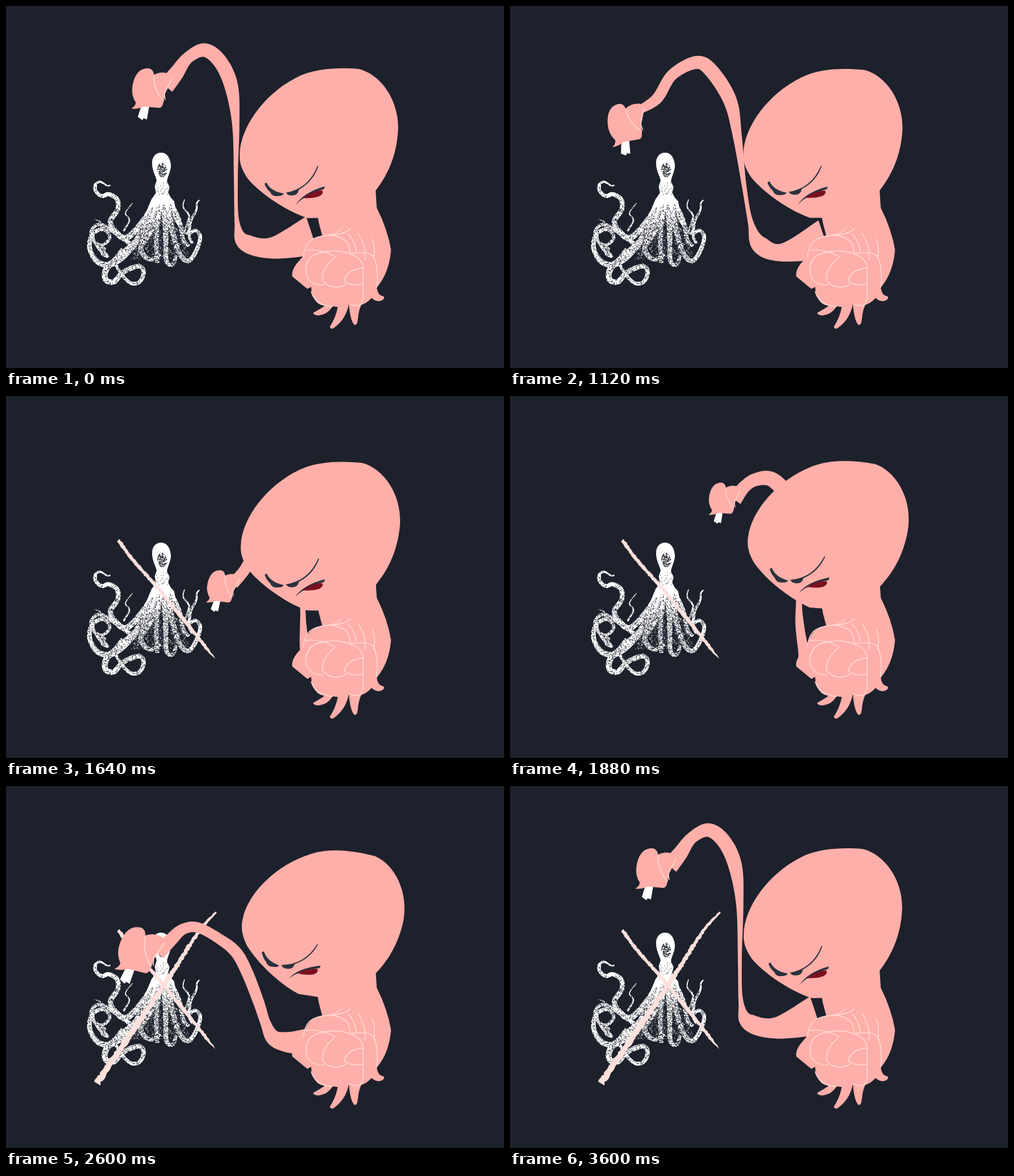
Write an HTML page with a canvas that moves like this. It is 767 by 558 pixels and loops after 3.84 s.

```html
<!DOCTYPE html>
<html lang="en">
<head>
<meta charset="utf-8">
<title>Crossing out the octopus</title>
<style>
html, body { margin: 0; width: 100%; height: 100%; overflow: hidden; background: #1d212c; }
canvas { display: block; }
</style>
</head>
<body>
<canvas id="stage" width="767" height="558"></canvas>
<script>
const LOOP = 3840, STEP = 40;
const BG = '#1d212c', PINK = '#ffafa9', LINE = '#ffdcd8', CHALK = '#ffe0dc', INK = '#2a323e', RED = '#7b0f1f';
const ctx = document.getElementById('stage').getContext('2d');

const clamp = v => Math.max(0, Math.min(1, v));
const mix = (a, b, k) => a + (b - a) * k;
const mixAll = (a, b, k) => a.map((v, i) => mix(v, b[i], k));
const linear = k => k;
const easeOut = k => 1 - (1 - k) ** 2;
const easeInOut = k => k * k * (3 - 2 * k);
const random = seed => () => (seed = (seed * 16807) % 2147483647) / 2147483647;

// Catmull-Rom samples through flat tuples of the given size
function spline(flat, size, steps = 10) {
  const n = flat.length / size, out = [];
  const at = (i, c) => flat[Math.max(0, Math.min(n - 1, i)) * size + c];
  for (let s = 0; s <= (n - 1) * steps; s++) {
    const i = Math.min(n - 2, Math.floor(s / steps)), u = s / steps - i, sample = [];
    for (let c = 0; c < size; c++) {
      const a = at(i - 1, c), b = at(i, c), d = at(i + 1, c), e = at(i + 2, c);
      sample.push(b + u / 2 * (d - a + u * (2 * a - 5 * b + 4 * d - e + u * (3 * (b - d) + e - a))));
    }
    out.push(sample);
  }
  return out;
}

// Fills a band around [x, y, width] samples
function ribbon(g, samples, rough = () => 1) {
  const left = [], right = [];
  samples.forEach(([x, y, w], i) => {
    const a = samples[Math.max(0, i - 1)], b = samples[Math.min(samples.length - 1, i + 1)];
    const dx = b[0] - a[0], dy = b[1] - a[1], r = w / 2 / (Math.hypot(dx, dy) || 1);
    const l = r * rough(), m = r * rough();
    left.push([x - dy * l, y + dx * l]);
    right.unshift([x + dy * m, y - dx * m]);
  });
  g.beginPath();
  left.concat(right).forEach(p => g.lineTo(...p));
  g.fill();
}

// Arm poses: x, y, width from wrist to shoulder
const RAISED = [246,124,26, 262,104,23, 280,80,18, 306,68,21, 330,86,22, 347,124,21,
  354,185,11, 354,270,6, 356,335,8, 368,364,26, 410,373,33, 472,354,62];
const AIM = [202,159,13, 227,142,17, 250,106,17, 287,87,20, 311,101,22, 339,146,21,
  350,200,14, 361,280,7, 371,335,9, 385,368,27, 420,380,28, 485,360,62];
const FIRST = [320,319,16, 342,308,16, 358,290,16, 376,270,16, 400,252,18, 430,250,18,
  452,280,12, 463,330,8, 464,352,8, 464,375,14, 470,395,24, 480,400,40];
const LIFTED = [346,160,22, 361,140,19, 378,129,20, 402,128,23, 425,150,24, 445,190,22,
  446,240,14, 445,310,9, 446,350,13, 452,390,17, 460,410,28, 480,415,40];
const SECOND = [298,252,20, 316,237,17, 338,221,20, 367,207,24, 400,210,26, 420,240,22,
  424,270,16, 427,312,15, 438,358,15, 449,394,18, 460,410,28, 480,415,40];
const LOW = [190,408,22, 225,382,20, 255,360,18, 290,335,18, 325,320,18, 355,318,18,
  380,330,17, 400,350,16, 412,368,16, 425,388,24, 440,398,32, 465,400,40];
const BACK = [234,258,22, 254,237,20, 272,221,17, 295,218,16, 326,234,16, 354,256,18,
  372,289,18, 389,333,17, 400,366,16, 412,388,24, 435,395,32, 465,394,40];
// Moves the wrist; the effect fades out along the arm
const reach = (arm, dx, dy) => arm.map((v, i) =>
  v + [dx, dy, 0][i % 3] * Math.max(0, 1 - Math.floor(i / 3) / 6));

// time, arm, hand [x, y, angle, scale], easing towards this key
const ARM_KEYS = [
  [760, RAISED, [218, 127, 0, 1], linear],
  [1120, AIM, [174, 181, -.26, 1], easeInOut],
  [1300, reach(AIM, -3, -4), [171, 177, -.22, 1], easeInOut],
  [1440, FIRST, [300, 326, .07, .83], linear],
  [1480, reach(FIRST, 31, 41), [331, 367, .07, .82], linear],
  [1880, LIFTED, [325, 158, -.02, .79], easeInOut],
  [2200, reach(LIFTED, 5, -1), [331, 157, 0, .79], easeInOut],
  [2280, SECOND, [280, 241.5, .12, .88], linear],
  [2440, LOW, [162, 415, .16, 1.08], linear],
  [2600, BACK, [200, 252, .16, 1.12], linear],
  [2920, RAISED, [218, 127, 0, 1], easeOut]
];
// time, head [angle, x, y], easing
const HEAD_KEYS = [
  [760, [0, 0, 0], linear],
  [1120, [.025, 0, 0], easeInOut],
  [1300, [.02, 0, 1], easeInOut],
  [1440, [-.02, -2, 6.5], linear],
  [1880, [.1, 8, 1], easeInOut],
  [2000, [.11, 9, 1], easeInOut],
  [2280, [.06, 5, 4], easeInOut],
  [2440, [.08, 5, 3], linear],
  [2600, [.18, 6, -2], easeInOut],
  [2720, [.19, 7, -2], easeOut],
  [3600, [0, 0, 0], easeInOut]
];
function pose(keys, t, column) {
  const next = keys.findIndex(key => key[0] > t);
  if (next <= 0) return keys[next < 0 ? keys.length - 1 : 0][column];
  const a = keys[next - 1], b = keys[next];
  return mixAll(a[column], b[column], b[b.length - 1]((t - a[0]) / (b[0] - a[0])));
}

const HEAD = new Path2D('M360 228C361 188 396 137 446 111C476 95 515 95 543 97C577 105 604 144 604 187C603 224 591 257 569 285L545 325L465 327C426 314 388 285 373 267C363 253 359 241 360 228Z');
const BODY = new Path2D('M479 318L482 335L487 354Q464 357 458 385L447 398Q439 409 441 417L464 436L470 433Q470 448 480 458Q488 463 492 461Q486 466 473 473Q474 477 482 477Q496 475 503 463L511 464Q508 480 499 494Q499 498 504 497Q524 483 528 459Q530 484 536 491Q541 494 542 482Q543 470 547 461Q556 458 563 450Q568 455 575 455Q584 453 582 448Q572 446 571 434Q590 412 593 376Q588 345 571 311L569 280L530 260Z');
const CREASES = new Path2D('M458 387Q460 364 475 358Q505 347 525 363Q530 372 530 381' +
  'M462 377Q480 373 507 386M462 410Q460 386 485 380Q512 373 537 385Q548 390 550 403V450Q548 458 546 460' +
  'M462 410Q466 431 490 430M507 387Q484 406 488 424Q500 437 518 432L524 428' +
  'M549 404Q525 406 521 424Q530 432 549 429M530 382Q562 376 568 390Q574 410 571 434' +
  'M497 353Q510 352 516 343M500 353Q522 352 531 343M542 350Q556 373 553 392' +
  'M526 351Q537 360 540 380M564 359Q570 375 566 391M470 440Q476 462 503 463M528 459Q538 463 546 461');
const BROWS = new Path2D('M398 274L401 272Q408 286 428 289Q426 293 418 293Q410 294 407 287Q401 282 398 274Z' +
  'M430 288Q466 282 480 246L481 247Q473 271 451 283Q450 292 440 292Q433 292 432 288Z' +
  'M446 307Q457 288 491 278L490 282Q468 289 459 296Q453 299 446 307Z');
const MOUTH = new Path2D('M458 296Q469 286 487 284Q490 289 483 293Q472 297 458 296Z');
const HAND = new Path2D('M200 149Q192 137 195 122Q199 101 212 97Q226 93 228 106Q238 100 250 104Q259 107 255 114L245 135L242 150Q240 158 235 157L212 155Q200 160 193 158Q199 155 200 149Z');
const KNUCKLES = new Path2D('M228 106Q226 128 243 147M256 111L244 135L245 145');
const STUB = new Path2D('M209 152L221 152L217 175L212 173L210 176L203 171Z');

// Engraving-like octopus, prepared once on its own layer
function makeOctopus() {
  const layer = document.createElement('canvas');
  layer.width = 320; layer.height = 450;
  const g = layer.getContext('2d'), rnd = random(77);
  g.fillStyle = '#fff';
  const leg = (w0, w1, ...points) => {
    const line = spline(points, 2, 12);
    ribbon(g, line.map(([x, y], i) => [x, y, mix(w0, w1, i / line.length)]));
  };
  const speckle = (count, x, y, w, h, color, size, keep = () => true) => {
    g.fillStyle = color;
    for (let i = 0; i < count; i++) {
      const px = x + rnd() * w, py = y + rnd() * h;
      if (keep(px, py)) g.fillRect(px, py, size, size);
    }
  };
  speckle(1500, 190, 310, 95, 80, '#fff', 1, (x, y) => Math.abs(x - 238) < (y - 280) * .42);
  leg(10, 5, 237,290, 214,328, 186,357, 167,346, 161,331, 172,314, 171,298, 158,290, 148,293, 138,285, 138,274);
  leg(5, 1.5, 138,285, 137,276, 145,271, 156,277, 161,276);
  leg(11, 3, 238,290, 217,335, 193,373, 165,397, 142,395, 129,374, 133,352, 150,344, 160,356, 150,368, 137,364, 134,350);
  leg(7, 3, 200,372, 175,355, 154,340, 139,338, 131,352, 146,378, 157,386, 148,375);
  leg(11, 4, 239,290, 214,347, 180,382, 156,403, 153,421, 166,425, 181,410, 204,401, 212,410, 206,425, 192,427, 177,412, 168,392, 179,374);
  leg(11, 5, 239,290, 224,343, 208,374, 222,391, 238,382);
  leg(9, 6, 240,290, 232,345, 233,396);
  leg(9, 5, 242,290, 246,348, 247,392, 257,398, 262,384);
  leg(9, 4, 244,290, 256,346, 267,381, 281,393, 294,375, 299,355, 291,346, 282,354, 287,366);
  leg(9, 5, 245,288, 266,330, 273,360, 282,370);
  leg(7, 1.5, 248,292, 262,328, 279,350, 285,330, 293,315, 294,304, 298,299);
  leg(4, 1, 276,345, 282,324, 273,310, 275,298);
  leg(3, 1, 181,347, 190,330, 184,319, 195,304);
  leg(3, 1, 140,372, 153,374, 147,383, 157,388);
  leg(3, 1, 150,340, 144,332, 136,329);
  g.globalCompositeOperation = 'source-atop';
  speckle(4600, 125, 305, 178, 125, BG, 1.1);
  speckle(420, 125, 268, 58, 75, BG, 1.1);
  speckle(900, 205, 335, 75, 65, BG, 1.1);
  g.globalCompositeOperation = 'source-over';
  g.fillStyle = '#fff';
  g.fill(new Path2D('M239 226C249 226 254 237 254 247C253 258 248 264 248 271L252 279L249 290L259 301L262 318L252 302L250 320L244 299L238 318L236 300L223 330L227 308L212 327L224 298L231 288L229 278L232 269C230 260 225 254 225 242C225 233 230 226 239 226Z'));
  speckle(150, 233, 241, 14, 22, BG, 1.3, (x, y) => Math.hypot((x - 240) / 7, (y - 252) / 11) < 1);
  speckle(22, 230, 271, 21, 20, BG, 1);
  return layer;
}
const octopus = makeOctopus();

const chalkLine = (points, w0, w1) => spline(points, 2, 45).map(([x, y], i, all) => [x, y, mix(w0, w1, i / all.length)]);
const STROKES = [
  { line: chalkLine([173,223, 200,258, 242,306, 322,405], 5.5, 5.5), start: 1300, time: 180, taper: 12 },
  { line: chalkLine([324,194, 296,226, 243,307, 140,458], 2.5, 10.5), start: 2200, time: 240, taper: 0 }
];
function drawStroke({ line, start, time, taper }, t, seed) {
  const count = Math.floor(line.length * clamp((t - start) / time));
  if (count < 2) return;
  const rnd = random(seed);
  const part = line.slice(0, count).map(([x, y, w], i) =>
    [x + rnd() - .5, y + rnd() - .5, taper ? w * Math.min(1, (line.length - i) / taper) : w]);
  ctx.fillStyle = CHALK;
  ribbon(ctx, part, () => .7 + rnd() * .5);
}

function fill(path, color) {
  ctx.fillStyle = color;
  ctx.fill(path);
}
function outline(path) {
  ctx.strokeStyle = LINE;
  ctx.lineWidth = 1.3;
  ctx.stroke(path);
}
// Draws around a pivot with rotation and scale
function placed(px, py, x, y, angle, scale, draw) {
  ctx.save();
  ctx.translate(x, y);
  ctx.rotate(angle);
  ctx.scale(scale, scale);
  ctx.translate(-px, -py);
  draw();
  ctx.restore();
}

function render(t) {
  ctx.fillStyle = BG;
  ctx.fillRect(0, 0, 767, 558);
  ctx.drawImage(octopus, 0, 0);
  STROKES.forEach((stroke, i) => drawStroke(stroke, t, 31 + i * 1000));

  ctx.fillStyle = PINK;
  ribbon(ctx, spline(pose(ARM_KEYS, t, 1), 3));
  placed(218, 127, ...pose(ARM_KEYS, t, 2), () => {
    fill(STUB, '#fff');
    fill(HAND, PINK);
    outline(KNUCKLES);
  });

  const [angle, dx, dy] = pose(HEAD_KEYS, t, 1);
  const onHead = draw => placed(480, 210, 480 + dx, 210 + dy, angle, 1, draw);
  onHead(() => fill(HEAD, PINK));
  fill(BODY, PINK);
  outline(CREASES);
  onHead(() => {
    fill(BROWS, INK);
    fill(MOUTH, RED);
  });
}

const began = performance.now();
function tick() {
  const t = (performance.now() - began) % LOOP;
  render(Math.floor(t / STEP) * STEP);
  requestAnimationFrame(tick);
}
tick();
</script>
</body>
</html>
```
